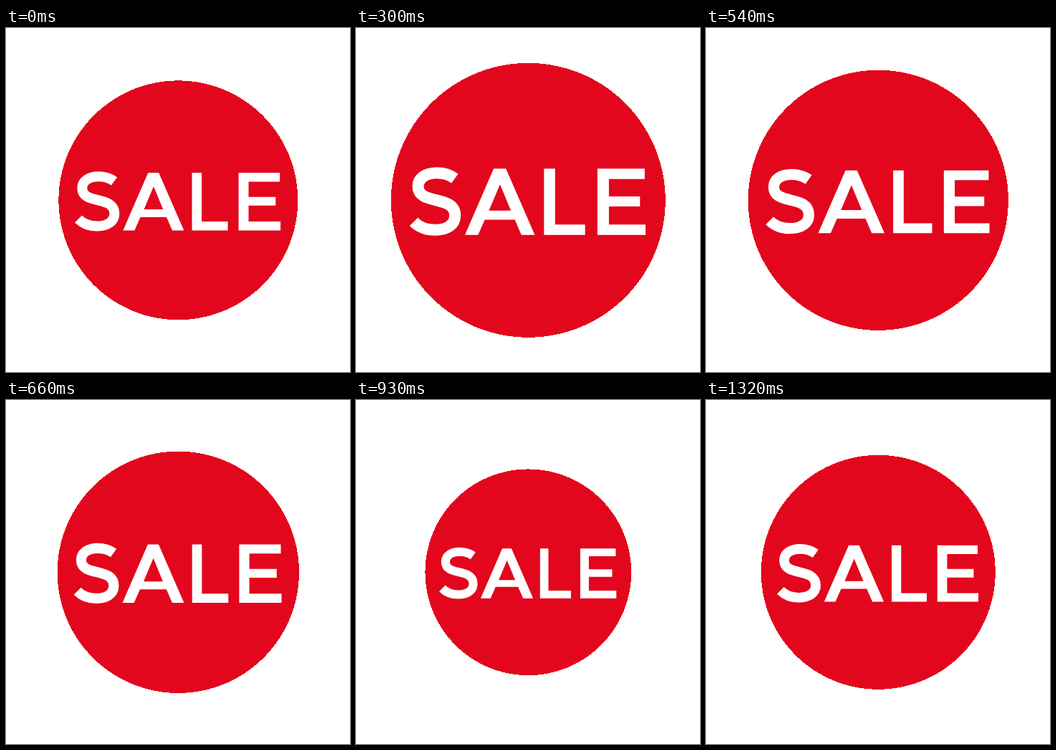
These frames come from a looping animation (480 px wide and 480 px high, 1.35 s). An HTML page with a canvas:

```html
<!DOCTYPE html>
<html lang="en">
<head>
<meta charset="utf-8">
<title>Pulsing sale badge</title>
<style>
html, body { margin: 0; width: 100%; height: 100%; overflow: hidden; background: #fff; }
canvas { display: block; }
</style>
</head>
<body>
<canvas id="stage" width="480" height="480" role="img" aria-label="SALE">SALE</canvas>
<script>
const ctx = document.getElementById('stage').getContext('2d');
const LOOP = 1350, STEP = 30;
const CENTER = 240.3, BASE_RADIUS = 166.9, SWING = 24.9;
const RED = '#e2071d', WHITE = '#fff';

// Lettering at base size; S is a stroke, the others are filled outlines.
const letterS = new Path2D('M151 213.8C145.5 209.8 137.5 207.2 129 207.2C115.5 207.2 106.3 213.5 106.3 223.5' +
  'C106.3 247 151.3 233 151.3 259C151.3 270 141.5 276.5 127 276.5C116.5 276.5 107 272.5 101 266.5');
const letterA = 'M163.3 282.5L198.3 202H213.2L248.3 282.5H232L224 264H187.5L179.3 282.5ZM192.5 253H219.2L206 221Z';
const letterL = 'M259.5 202H273V270H309.5V282.5H259.5Z';
const letterE = 'M324.5 202H382V214.5H338.5V235.7H376.3V247.8H338.5V270H383V282.5H324.5Z';
const outlines = new Path2D(letterA + letterL + letterE);

// Whole-pixel rows keep the rim crisp.
function drawDisc(radius) {
  ctx.fillStyle = RED;
  for (let y = 0; y < 480; y++) {
    const dy = y + 0.5 - CENTER;
    if (Math.abs(dy) >= radius) continue;
    const half = Math.sqrt(radius * radius - dy * dy);
    const left = Math.round(CENTER - half);
    ctx.fillRect(left, y, Math.round(CENTER + half) - left, 1);
  }
}

function drawWord(scale) {
  ctx.save();
  ctx.translate(CENTER, CENTER);
  ctx.scale(scale, scale);
  ctx.translate(-CENTER, -CENTER);
  ctx.fillStyle = ctx.strokeStyle = WHITE;
  ctx.lineWidth = 14;
  ctx.stroke(letterS);
  ctx.fill(outlines, 'evenodd');
  ctx.restore();
}

function draw(time) {
  const t = Math.floor((time % LOOP) / STEP) * STEP;
  const radius = BASE_RADIUS + SWING * Math.sin(2 * Math.PI * t / LOOP);
  ctx.fillStyle = WHITE;
  ctx.fillRect(0, 0, 480, 480);
  drawDisc(radius);
  drawWord(radius / BASE_RADIUS);
}

const start = performance.now();
function tick() {
  draw(performance.now() - start);
  requestAnimationFrame(tick);
}
tick();
</script>
</body>
</html>
```
